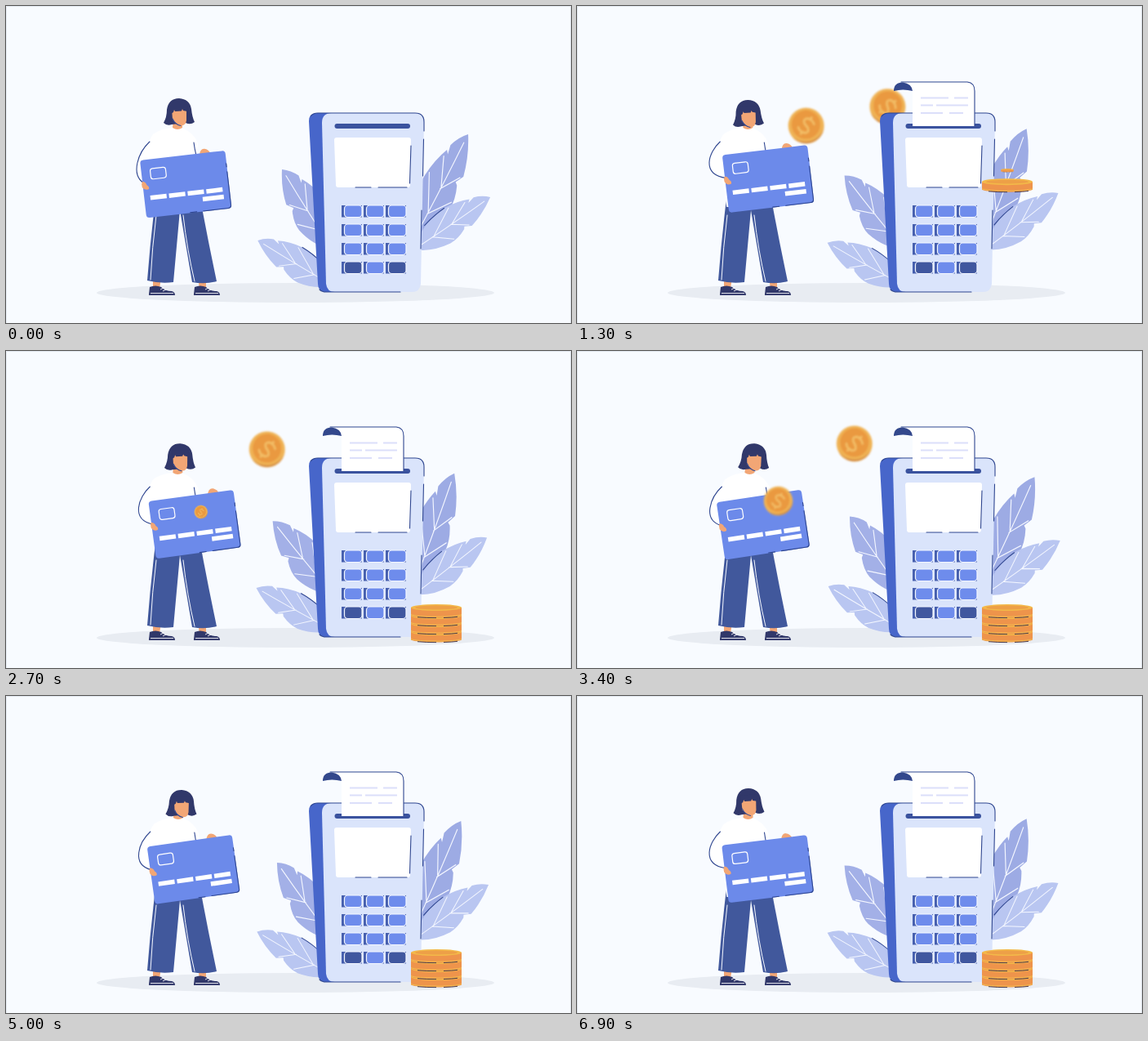
An HTML page that plays this animation: 692 px wide and 388 px high, repeating every 7 s.

```html
<!DOCTYPE html>
<html lang="en">
<head>
<meta charset="utf-8">
<title>Card payment</title>
<style>
html, body { margin: 0; width: 100%; height: 100%; overflow: hidden; background: #f8fbff; }
svg { display: block; width: 100vw; height: 100vh; }
.line { fill: none; stroke: #2f4690; stroke-width: 1.1; stroke-linecap: round; stroke-linejoin: round; }
.vein { fill: none; stroke: #f4f7ff; stroke-width: 1; stroke-linecap: round; }
.navy { fill: #31386a; }
.skin { fill: #f2a675; }
.white { fill: #fff; }
</style>
</head>
<body>
<svg viewBox="0 0 692 388">
  <defs>
    <g id="leaf">
      <path d="M0 0C-12-12-23-30-22-52Q-20-68-13-80L-10-77L-12-85Q-8-94 0-100Q12-84 17-66L12-59L15-57Q21-46 20-36Q16-14 0 0Z"/>
      <path class="vein" d="M0-4Q1-50 0-92M0-26L-19-56M0-50L-13-74M0-24L18-42M0-48L14-64"/>
    </g>
    <g id="coin">
      <circle r="22" fill="#efb254"/>
      <path d="M20-9A22 22 0 0 1-7 20.500A24 24 0 0 0 20-9Z" fill="#d18a45"/>
      <circle cx="-1" cy="-1" r="17.500" fill="#ea993f"/>
      <path d="M7-7Q2-11-4-8Q-8-4-3-1L3 1Q8 4 4 8Q-2 11-7 7M0-12V-9M0 9V12" fill="none" stroke="#f3bf68" stroke-width="2.6" stroke-linecap="round"/>
    </g>
    <g id="disc">
      <path d="M-31 0V9.500C-25 13.500 25 13.500 31 9.500V0Z" fill="#ee944b"/>
      <path d="M-31 8.500C-25 12 25 12 31 8.500" fill="none" stroke="#f3bd4f"/>
      <path d="M-23 11.700Q-11 12.800 0 12.600M9 12.500Q20 12.200 26 11.300" fill="none" stroke="#4a3c4c"/>
      <ellipse rx="31" ry="4" fill="#f3b949"/>
      <ellipse rx="26" ry="2.400" fill="#eda047"/>
    </g>
    <g id="shoe">
      <path class="navy" d="M0 10L1 1Q8-2 15 1Q20 6 28 6Q32 7 32 11H0Z"/>
      <path d="M2 8.600H30M14 4L18 2M17 6L21 4" stroke="#fff" stroke-width=".9" fill="none"/>
    </g>
    <filter id="soft" x="-20%" y="-20%" width="140%" height="140%"><feGaussianBlur stdDeviation="1.2"/></filter>
    <filter id="fall" x="-5%" y="-100%" width="110%" height="300%"><feGaussianBlur stdDeviation="0 3"/></filter>
    <clipPath id="slot"><path d="M380 60H500V147H380Z"/></clipPath>
  </defs>

  <rect width="692" height="388" fill="#f8fbff"/>
  <path d="M.5 388V.5H691.5V388" fill="none" stroke="#e4e9f1"/>
  <ellipse cx="354.500" cy="351" rx="243.500" ry="12" fill="#e8ecf2"/>

  <g id="leaves"></g>

  <!-- woman -->
  <path class="skin" d="M180 332H190L188 346H180ZM235 332H245V346H237Z"/>
  <use href="#shoe" x="175" y="343"/>
  <use href="#shoe" x="230" y="343"/>
  <path fill="#41589c" d="M183 236H238Q247 285 258 337Q244 341 228 338L213 250L205 338Q189 340 173 336Q177 285 183 236Z"/>
  <path class="vein" d="M184 256Q179 295 177 335M217 256Q222 300 231 337"/>
  <g id="body">
    <path class="white" d="M203 149Q190 150 180 157Q170 170 176 196L184 246H233L235 168Q230 155 217 150Z"/>
    <path class="skin" d="M205 138H216V149Q210 153 204 149Z"/>
    <path class="line" d="M230 167Q231 175 233 183"/>
  </g>
  <g id="head">
    <path class="navy" d="M193 143Q197 136 197 127Q199 113 212 113Q225 114 227 126Q228 136 231 142Q226 146 220 143L203 145Q197 147 193 143Z"/>
    <path class="skin" d="M203 126H221V140Q220 147 214 146Q208 145 204 139Z"/>
    <path class="navy" d="M202 121H223L222 129L217 128L216 126L215 128.500L207 129L206 127L205 130L202 132Z"/>
    <path class="line" d="M204 138Q207 145 214 146.500"/>
  </g>
  <path id="sleeve" class="white"/>
  <path id="arm" class="line"/>
  <g id="card">
    <path class="skin" d="M73 2Q75-6 80-5Q85-4 87 2Z"/>
    <rect width="105" height="71" rx="4" fill="#6c8aea"/>
    <path class="line" d="M104.500 16V20M104.500 26V67Q104.500 70.500 101 70.500H70M62 70.500H54"/>
    <rect x="11" y="11.500" width="19" height="13" rx="3" fill="none" stroke="#fff" stroke-width="1.200"/>
    <path d="M7.500 47H97" stroke="#fff" stroke-width="5.500" stroke-dasharray="20 3"/>
    <path d="M71 56H97" stroke="#fff" stroke-width="5.500"/>
    <path class="skin" d="M0 26Q4 27 5 31Q8 33 7 36Q2 38-1 33Q-2 29 0 26Z"/>
  </g>

  <g id="coins"></g>

  <!-- terminal -->
  <path fill="#4766ca" d="M371 141Q371 131 381 131H402V350H391Q382 349 382 340Z"/>
  <path fill="#dae4fb" d="M387 143Q387 131 399 131H501Q512 131 512 142L508 340Q507 350 497 350H403Q393 350 392 340Z"/>
  <path class="line" d="M373 135Q376 131 382 131H501Q512 131 512 142V153M511.500 163L510.500 208M509 250L508 297M384 347Q387 350 392 350H483"/>
  <path class="white" d="M405 161H493Q496 161 496 164L495 219Q495 222 492 222H407Q404 222 404 219L402 164Q402 161 405 161Z"/>
  <path class="line" d="M496 171L494.500 217M428 222H447M456 222H491"/>
  <g id="keys"></g>
  <rect x="402.500" y="144" width="92.500" height="6" rx="3" fill="#3a529e"/>
  <g clip-path="url(#slot)">
    <g id="paper">
      <path class="white" d="M398 93H478Q487 94 487 104V215H411V106Q409 95 398 93Z"/>
      <path fill="#33488c" d="M388 104Q388 93.500 399 93.500Q410 95 411 104Q399 101 388 104Z"/>
      <path class="line" d="M397 93H478Q487 94 487 104V220"/>
      <path d="M421 112.500H455M462 112.500H479M421 121.500H436M440 121.500H479M421 131H448M456 131H473" stroke="#dcdffa" stroke-width="1.800"/>
    </g>
  </g>
  <g id="stack"></g>
</svg>
<script>
const $ = id => document.getElementById(id);
const set = (el, attrs) => { for (const k in attrs) el.setAttribute(k, attrs[k]); return el; };
const add = (parent, tag, attrs) =>
  set(parent.appendChild(document.createElementNS('http://www.w3.org/2000/svg', tag)), attrs);
const many = (n, make) => Array.from({ length: n }, (_, i) => make(i));
const clamp = v => Math.max(0, Math.min(1, v));
const wave = (t, period) => Math.cos(2 * Math.PI * t / period);
const bezier = (a, b, c, d, u) =>
  a * (1 - u) ** 3 + 3 * b * u * (1 - u) ** 2 + 3 * c * u * u * (1 - u) + d * u ** 3;

// Base point, resting angle, swing and size of each leaf
const leaves = [
  { x: 500, y: 285, angle: 27.3, swing: 9.5, w: 1.1, h: 1.44, fill: '#9dabe4' },
  { x: 500, y: 298, angle: 55.5, swing: 4.5, w: .95, h: 1.13, fill: '#b9c6f1' },
  { x: 400, y: 298, angle: -32.3, swing: 9, w: -1.1, h: 1.16, fill: '#a3b0e7' },
  { x: 400, y: 342, angle: -59, swing: 2.5, w: -.95, h: 1.07, fill: '#b9c6f1' }
];
for (const l of leaves) {
  l.el = add($('leaves'), 'g', { fill: l.fill });
  add(l.el, 'use', { href: '#leaf' });
}
add(leaves[1].el, 'path', { class: 'line', d: 'M-18-24Q-22-38-22-52' });
add(leaves[3].el, 'path', { class: 'line', d: 'M-18-24Q-22-38-22-52' });

for (let r = 0; r < 4; r++) for (let c = 0; c < 3; c++) {
  const x = 411 + 27 * c, y = 244 + 23 * r, dark = r === 3 && c !== 1;
  add($('keys'), 'path', { d: `M${x} ${y}h25v14.500h-25z`, fill: '#465fae' });
  add($('keys'), 'rect', { x: x + 3.5, y, width: 21.5, height: 14.5, rx: 4, fill: dark ? '#40579f' : '#6e8cec', stroke: '#f4f7ff', 'stroke-width': 1.2 });
}

const coins = many(10, () => add($('coins'), 'use', { href: '#coin' }));
const discs = many(4, () => add($('stack'), 'use', { href: '#disc' }));

function drawWoman(t) {
  const rise = 1 - (1 - clamp(t / 1.2)) ** 2;
  const sway = rise * (1.7 - 4.3 * wave(t - 1.6, 4.8));
  const shift = sway * .3;
  const nod = rise * (1 + wave(t - 1.3, 3.7));
  set($('head'), { transform: `translate(${sway * .8} ${nod}) rotate(${sway * .6} 211 150)` });
  set($('body'), { transform: `translate(${shift})` });

  // The card leans against the sway of the body
  const x = 164 + rise * 11.5 - sway, y = 189 - rise * 5.5 + sway * .4;
  set($('card'), { transform: `translate(${x} ${y}) rotate(${-6.6 - rise * .8 - sway * .25})` });
  const hx = x + 5, hy = y + 28, sx = 176 + shift;
  const outer = `M${sx} 166C${sx - 14} 179 ${sx - 24} 206 ${hx} ${hy}`;
  set($('arm'), { d: outer });
  set($('sleeve'), { d: `${outer}L${hx + 9} ${hy - 14}L${sx + 24} 158L${sx + 6} 156Z` });
}

// From the card over an arc to behind the terminal
function drawCoin(el, i, t) {
  const u = (t - .45 - .32 * i) / .62;
  if (u <= 0 || u > 1) return set(el, { visibility: 'hidden' });
  const x = bezier(238, 252, 371, 397, u), y = bezier(199, 160, 52, 156, u);
  set(el, {
    visibility: 'visible',
    transform: `translate(${x} ${y}) rotate(${20 + 40 * u}) scale(${clamp(.3 + u * 4.5)})`,
    filter: 'url(#soft)'
  });
}

// Hops out beside the terminal, then drops onto the pile
function drawDisc(el, i, t) {
  const age = t - 1.07 - .2 * i, rest = 344 - 10 * i;
  if (age <= 0) return set(el, { visibility: 'hidden' });
  const y = Math.min(rest, 194 + 1250 * (age - .1) ** 2);
  set(el, {
    visibility: 'visible',
    transform: `translate(527 ${y}) scale(${clamp(age / .12)})`,
    filter: age > .27 && y < rest ? 'url(#fall)' : 'none'
  });
}

function draw(t) {
  const breeze = (1 - wave(t, 4.1)) / 2;
  for (const l of leaves)
    set(l.el, { transform: `translate(${l.x} ${l.y}) rotate(${l.angle - l.swing * breeze}) scale(${l.w} ${l.h})` });
  drawWoman(t);
  set($('paper'), { transform: `translate(0 ${58 * (1 - clamp(t / .8)) ** 3})` });
  coins.forEach((el, i) => drawCoin(el, i, t));
  discs.forEach((el, i) => drawDisc(el, i, t));
}

// Ten pictures a second
function tick(now) {
  draw(Math.floor(now % 7000 / 100) / 10);
  requestAnimationFrame(tick);
}
draw(0);
requestAnimationFrame(tick);
</script>
</body>
</html>
```
